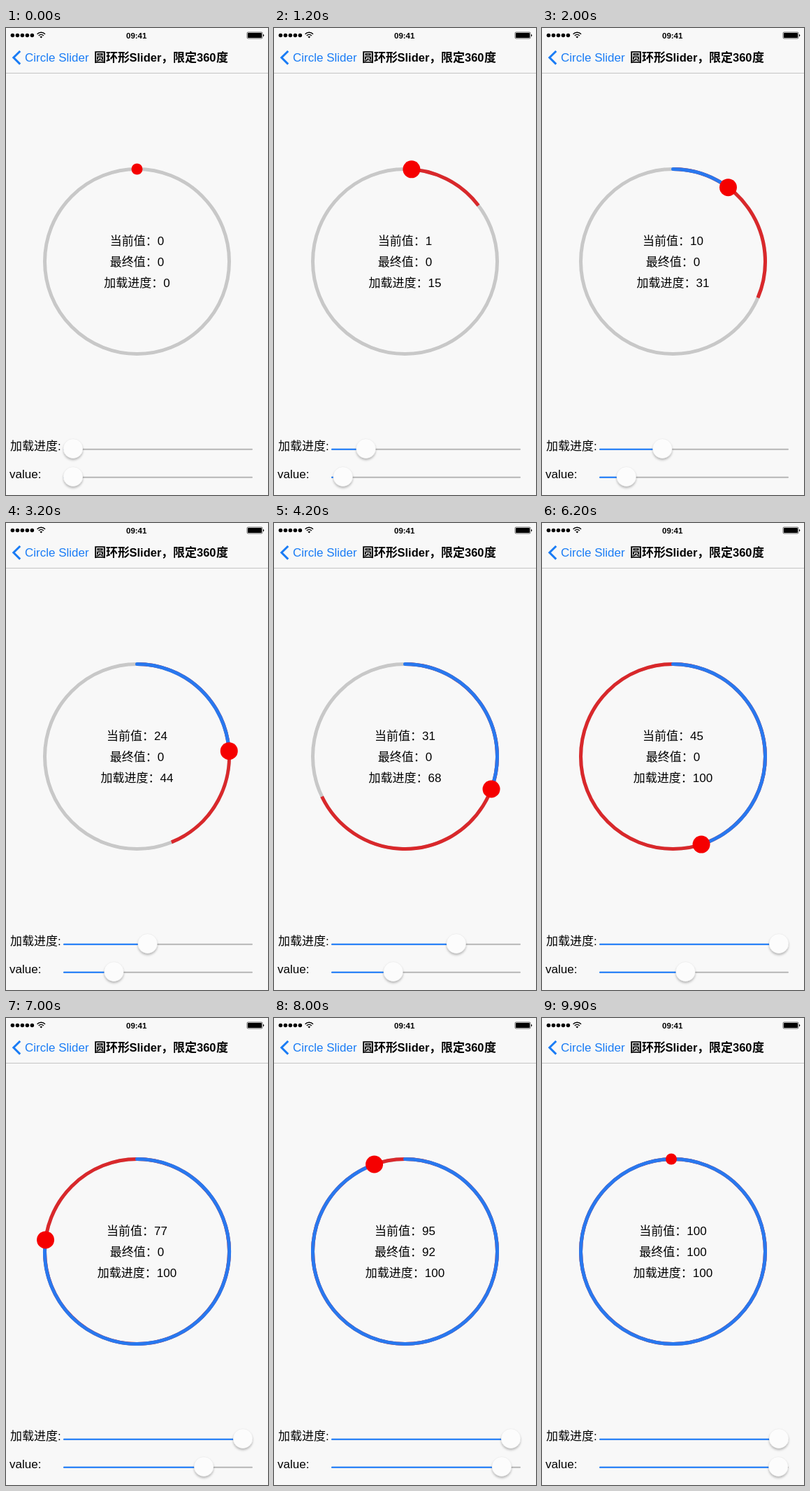
Write an HTML page that moves like this. It is 375x667 px and loops after 10000 ms.

```html
<!DOCTYPE html>
<html lang="zh-CN">
<head>
<meta charset="utf-8">
<title>Circle Slider</title>
<style>
  html, body { margin: 0; width: 100%; height: 100%; overflow: hidden; background: #f8f8f8; }
  svg { display: block; width: 375px; height: 667px; }
  text { font: 17px "Liberation Sans", "Noto Sans CJK SC", "Noto Sans CJK", sans-serif; fill: #000; }
  .title { font-weight: 600; }
  .title .latin { font-size: 16.5px; }
  .clock { font-size: 11.5px; font-weight: 700; }
  .middle { text-anchor: middle; }
  .ring { fill: none; stroke-width: 5; }
</style>
</head>
<body>
<svg viewBox="0 0 375 667" lang="zh-CN">
  <defs>
    <filter id="shadow" x="-50%" y="-50%" width="200%" height="200%">
      <feDropShadow dx="0" dy="2.5" stdDeviation="1.8" flood-color="#000" flood-opacity=".25"/>
    </filter>
  </defs>
  <rect width="375" height="667" fill="#f8f8f8"/>

  <g id="signal"></g>
  <g fill="none" stroke="#000" stroke-width="1.5">
    <path d="M44.6 8.7a8 8 0 0 1 11.4 0M46.8 11a5 5 0 0 1 7 0"/>
    <path d="M48.4 12.6a2.7 2.7 0 0 1 3.8 0L50.3 14.6z" fill="#000" stroke="none"/>
  </g>
  <text class="clock middle" x="186.7" y="14.6">09:41</text>
  <rect x="345" y="6" width="22" height="9" rx="1.5" fill="none" stroke="#000" stroke-width=".6"/>
  <rect x="346" y="7" width="20" height="7" rx=".8"/>
  <path d="M368 9v3.2q1.3-.4 1.3-1.6T368 9z"/>

  <path d="M20.2 33L10.8 42.3L20.2 51.6" fill="none" stroke="#1a7cf5" stroke-width="3"/>
  <text x="27" y="48" style="fill:#1a7cf5">Circle Slider</text>
  <text class="title" y="48"><tspan x="126">圆环形</tspan><tspan class="latin" x="176.5">Slider</tspan><tspan x="222">，</tspan><tspan x="239">限定</tspan><tspan class="latin" x="273">360</tspan><tspan x="301">度</tspan></text>
  <rect y="64" width="375" height="1" fill="#c4c4c4"/>

  <circle class="ring" cx="187.5" cy="333.5" r="132" stroke="#c8c8c8"/>
  <path id="loadArc" class="ring" stroke="#d9282b"/>
  <path id="valueArc" class="ring" stroke="#2878ef" stroke-linecap="round"/>
  <circle id="knob" fill="#f50000"/>

  <text id="current" class="middle" x="187.5" y="310"></text>
  <text id="final" class="middle" x="187.5" y="340"></text>
  <text id="loading" class="middle" x="187.5" y="370"></text>

  <text x="6" y="603">加载进度:</text>
  <text x="5" y="643">value:</text>
  <g id="sliders"></g>
</svg>
<script>
const NS = "http://www.w3.org/2000/svg";
const LOOP = 10000, STEP = 100;
const CX = 187.5, CY = 333.5, R = 132;

// [time in ms, percent]
const loadKeys = [[500, 0], [2000, 31.4], [3200, 43.9], [3800, 55], [5200, 100]];
const valueKeys = [[1100, 0], [2000, 10.2], [3200, 24.05], [3800, 30.73], [5400, 30.73],
  [6200, 45.03], [7100, 81], [7700, 92], [7900, 92], [8000, 94.6], [8900, 99.7]];
const touches = [[1200, 7700], [7900, 9100]];

const $ = id => document.getElementById(id);

function add(parent, tag, attrs) {
  const el = document.createElementNS(NS, tag);
  setAttrs(el, attrs);
  return parent.appendChild(el);
}

function setAttrs(el, attrs) {
  for (const name in attrs) el.setAttribute(name, attrs[name]);
}

function sample(keys, t) {
  if (t <= keys[0][0]) return keys[0][1];
  for (let i = 1; i < keys.length; i++) {
    const [t0, a] = keys[i - 1], [t1, b] = keys[i];
    if (t <= t1) return a + (b - a) * (t - t0) / (t1 - t0);
  }
  return keys[keys.length - 1][1];
}

function ringPoint(percent) {
  const angle = percent / 50 * Math.PI;
  return [CX + R * Math.sin(angle), CY - R * Math.cos(angle)];
}

function arc(percent) {
  if (percent <= 0) return "";
  const half = percent / 2;
  const to = p => `A${R} ${R} 0 0 1 ${ringPoint(p).join(" ")}`;
  return `M${CX} ${CY - R}${to(half)}${to(percent)}`;
}

function makeSlider(y) {
  const track = { x: 82, y: y, height: 2, rx: 1 };
  add($("sliders"), "rect", { ...track, width: 271, fill: "#b6b6b6" });
  const fill = add($("sliders"), "rect", { ...track, fill: "#1a7cff" });
  const thumb = add($("sliders"), "circle", {
    cy: y, r: 14, fill: "#fcfcfc", stroke: "#000", "stroke-opacity": .08,
    "stroke-width": .6, filter: "url(#shadow)"
  });
  return percent => {
    const x = 96 + 2.43 * percent;
    fill.setAttribute("width", x - 82);
    thumb.setAttribute("cx", x);
  };
}

for (let i = 0; i < 5; i++) add($("signal"), "circle", { cx: 9.4 + 7 * i, cy: 10.6, r: 2.75 });
const setLoadSlider = makeSlider(600.7);
const setValueSlider = makeSlider(640.7);

function render(t) {
  const load = sample(loadKeys, t), value = sample(valueKeys, t);
  const touched = touches.some(([from, to]) => t >= from && t < to);
  const lastRelease = touches.map(span => span[1]).filter(end => end <= t).pop();
  const released = lastRelease ? sample(valueKeys, lastRelease) : 0;
  const [cx, cy] = ringPoint(value);

  $("loadArc").setAttribute("d", arc(load));
  $("valueArc").setAttribute("d", arc(value));
  setAttrs($("knob"), { cx, cy, r: touched ? 12.5 : 8 });
  $("current").textContent = "当前值：" + Math.round(value);
  $("final").textContent = "最终值：" + Math.round(released);
  $("loading").textContent = "加载进度：" + Math.round(load);
  setLoadSlider(load);
  setValueSlider(value);
}

const start = performance.now();
function tick() {
  const t = (performance.now() - start) % LOOP;
  render(Math.floor(t / STEP) * STEP);
  requestAnimationFrame(tick);
}
tick();
</script>
</body>
</html>
```
